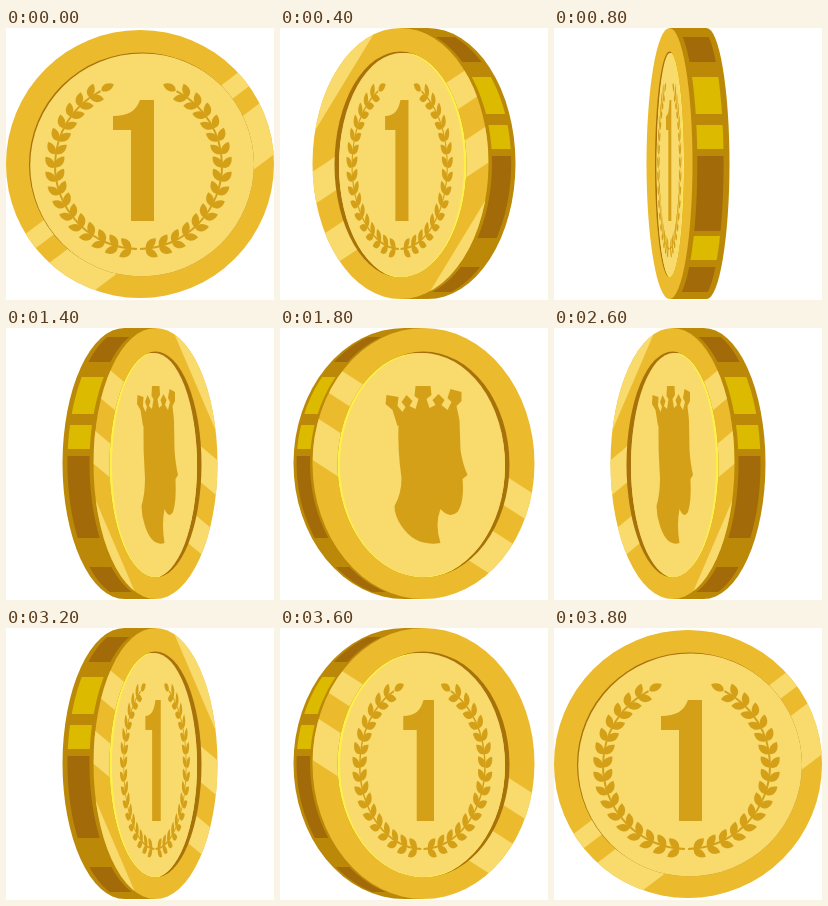
Write an HTML page with a canvas that moves like this. It is 268 by 272 pixels and loops after 4 s.

```html
<!DOCTYPE html>
<html lang="en">
<head>
<meta charset="utf-8">
<title>Spinning coin</title>
<style>
html, body { margin: 0; width: 100%; height: 100%; overflow: hidden; background: #fff; }
canvas { display: block; }
</style>
</head>
<body>
<canvas id="stage" width="268" height="272"></canvas>
<script>
const ctx = document.getElementById('stage').getContext('2d');
const STEP = 200, STEPS = 20, MID = 134;
const C = {
  rim: '#ecba2d', floor: '#f8da6d', mark: '#d4a017', shade: '#a8720a',
  glint: '#fff04a', edge: '#bb8907', dark: '#a36a09', bright: '#dcba00'
};

// From facing to edge-on. a: face half width, e: visible thickness,
// floor: half width of the sunk floor, relief: horizontal scale of the figures.
const POSES = [
  { a: 134, e: 0, floor: 112.5, relief: 1 },
  { a: 111, e: 19, floor: 86, relief: .75 },
  { a: 88, e: 27, floor: 66, relief: .57 },
  { a: 62, e: 31, floor: 46, relief: .375 },
  { a: 23, e: 37, floor: 14.5, relief: .13 },
  { a: 0, e: 38 }
];

// Pose, side the edge shows on, and whether the "1" face is visible.
function stateAt(i) {
  if (i <= 5) return [i, 1, true];
  if (i < 10) return [10 - i, -1, false];
  if (i < 15) return [i - 10, 1, false];
  return [19 - i, -1, true];
}

function ellipse(x, y, rx, ry, color) {
  ctx.beginPath();
  ctx.ellipse(x, y, Math.max(rx, 0), ry, 0, 0, 7);
  if (color) { ctx.fillStyle = color; ctx.fill(); }
}

function poly(points, color) {
  ctx.beginPath();
  points.forEach(p => ctx.lineTo(p[0], p[1]));
  ctx.closePath();
  ctx.fillStyle = color;
  ctx.fill();
}

function relief(x, scale, draw) {
  ctx.save();
  ctx.translate(x, 0);
  ctx.scale(scale, 1);
  ctx.fillStyle = ctx.strokeStyle = C.mark;
  draw();
  ctx.restore();
}

function drawOne() {
  ctx.fill(new Path2D('M14 72V193H-9V102H-27V88C-12 88-4 83 0 72Z'));
}

function leaf(x, y, angle) {
  ctx.save();
  ctx.translate(x, y);
  ctx.rotate(angle);
  ctx.fill(new Path2D('M1 0C3-5 10-6 15 0C10 5 4 4 1 0Z'));
  ctx.restore();
}

function branch() {
  const r = 83.5, cy = 137.5, from = 1.65, to = 4.24, n = 16;
  ctx.lineWidth = 2;
  ctx.beginPath();
  ctx.arc(0, cy, r, from - .06, to);
  ctx.stroke();
  for (let i = 0; i <= n; i++) {
    const t = from + (to - from) * i / n;
    const x = r * Math.cos(t), y = cy + r * Math.sin(t), dir = t + Math.PI / 2;
    if (i === n) return leaf(x, y, dir);
    leaf(x, y, dir - .65);
    leaf(x, y, dir + .7);
  }
}

function drawWreath() {
  branch();
  ctx.scale(-1, 1);
  branch();
}

function drawKing() {
  ctx.scale(4 / 3, 1);
  ctx.translate(-125, 0);
  // head, beard and bust
  ctx.fill(new Path2D('M99 96Q130 80 160 92L161 122Q163 136 168 147L163 151Q165 174 158 184' +
    'Q150 191 141 181Q135 196 141 215Q116 219 102 198Q95 188 95 178Q102 166 102 150Q98 122 99 96Z'));
  // crown
  ctx.fill(new Path2D('M98 98L93 82L86 76L87 67L99 69L98 78L103 84L106 79L102 74L107 67L113 73' +
    'L110 78L116 81L119 71L115 68L116 58L131 58L132 67L127 71L130 80L136 77L133 72L139 66L145 72' +
    'L142 77L148 82L152 74L148 70L151 61L162 64L162 73L157 78L160 92Q130 82 98 98Z'));
}

function drawEdge(p, cx, cy, ry, side) {
  const bx = cx + side * p.e;
  ellipse(bx, cy, p.a, ry, C.edge);
  ctx.fillStyle = C.edge;
  ctx.fillRect(Math.min(cx, bx), 0, p.e, 271);

  const steep = p.a < 30;
  const parts = [
    [9, 34, C.dark], [49, 86, C.bright], [97, 121, C.bright],
    [128, steep ? 203 : 210, C.dark], [239, 264, C.dark]
  ];
  if (steep) parts.push([208, 232, C.bright]);
  const at = (y, f) =>
    [cx + side * (p.a * Math.sqrt(1 - ((y - cy) / ry) ** 2) + p.e * f), y];
  for (const [top, bottom, color] of parts) {
    const pts = [], n = 10;
    for (let i = 0; i <= n; i++) pts.push(at(top + (bottom - top) * i / n, .13));
    for (let i = n; i >= 0; i--) pts.push(at(top + (bottom - top) * i / n, .84));
    poly(pts, color);
  }
}

// Slanted reflections that slide up and flatten as the coin turns.
function drawSheen(p, cx, cy, ry, side) {
  const { a, e } = p, l = cx - a, r = cx + a;
  const band = (top, bottom, slope) => {
    const d = MID * slope * side;
    poly([[l, top + d], [r, top - d], [r, bottom - d], [l, bottom + d]], C.floor);
  };
  ctx.save();
  ellipse(cx, cy, a, ry);
  ctx.clip();
  const slope = .76 - .012 * e;
  band(119 - 1.25 * e, 141 - .8 * e, slope);
  band(166 - .4 * e, 228 - 1.3 * e, slope);
  if (a < 100) {
    band(-200, -38, 1.08);
    band(312, 480, 1.08);
  }
  ctx.restore();
}

function drawFloor(x, rx, flat, side) {
  const y = 136.5, ry = flat ? 112 : 113;
  ctx.save();
  ellipse(x, y, rx, ry, C.shade);
  ctx.clip();
  if (flat) {
    ellipse(x + 1.2, y + .9, rx, ry, C.floor);
  } else {
    const w = Math.min(1, rx / 40);
    ellipse(x + side * 4.5 * w, y + 1.5, rx, ry, C.glint);
    ellipse(x + side * w, y + .5, rx - 3.5 * w, ry - 1, C.floor);
  }
  ctx.restore();
}

function drawCoin(i) {
  const [n, side, heads] = stateAt(i);
  const p = POSES[n], flat = n === 0;
  const cx = MID - side * p.e / 2;
  const cy = flat ? 136 : 135.5, ry = flat ? 134 : 135.5;
  ctx.fillStyle = '#fff';
  ctx.fillRect(0, 0, 268, 272);
  if (!flat) drawEdge(p, cx, cy, ry, side);
  if (!p.a) return;

  ellipse(cx, cy, p.a, ry, C.rim);
  if (p.a > 30) drawSheen(p, cx, cy, ry, flat ? 1 : side);
  drawFloor(cx + (flat ? 1.5 : 0), p.floor, flat, side);
  if (heads) {
    relief(cx - 1.5 * p.relief, p.relief, drawWreath);
    relief(cx, p.relief, drawOne);
  } else {
    relief(cx - (flat ? 0 : side), p.relief, drawKing);
  }
}

const start = performance.now();
let shown = -1;
function tick() {
  const i = Math.floor((performance.now() - start) / STEP) % STEPS;
  if (i !== shown) drawCoin(shown = i);
  requestAnimationFrame(tick);
}
tick();
</script>
</body>
</html>
```
